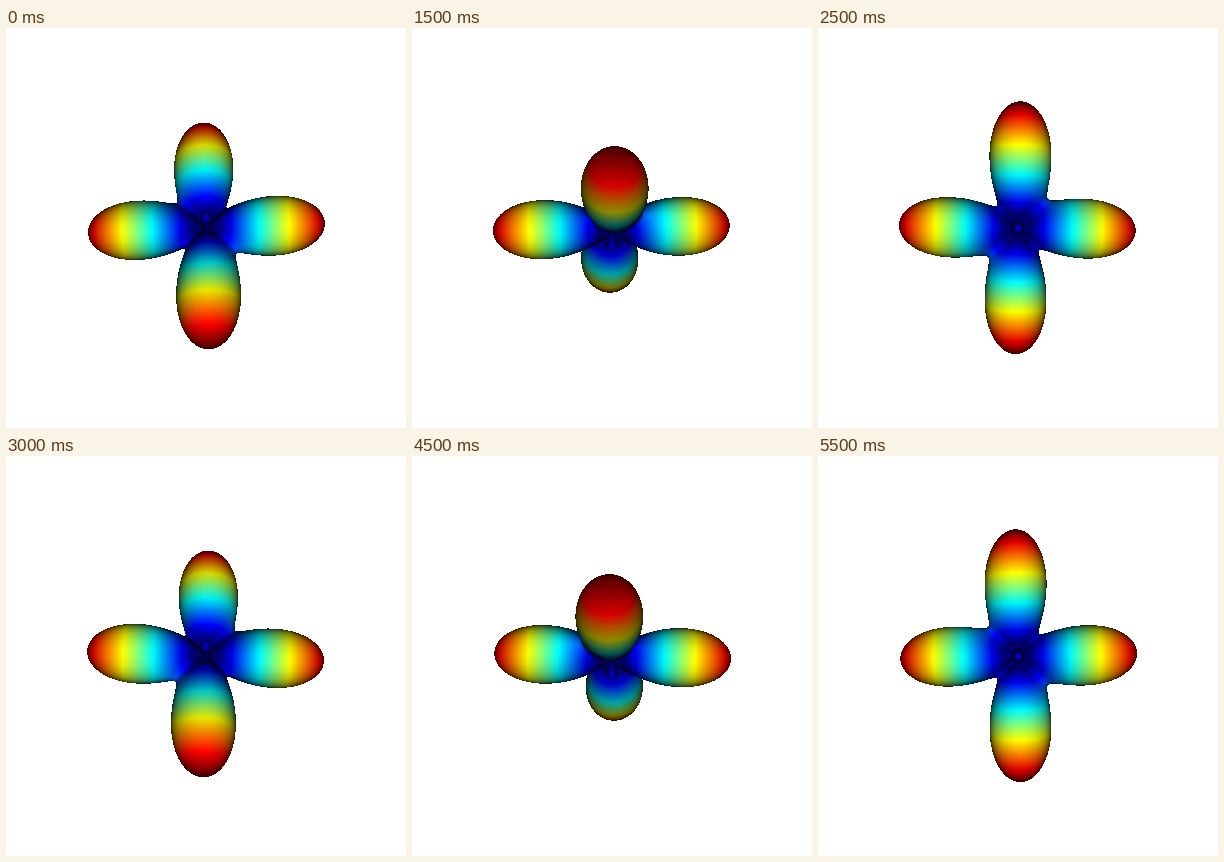
Recreate the animation shown at these times as an HTML page with a canvas. Size 400x400 px, loop 6000 ms.

```html
<!DOCTYPE html>
<html lang="en">
<head>
<meta charset="utf-8">
<title>Rotating four-lobed surface</title>
<style>
  html, body { margin: 0; width: 100%; height: 100%; overflow: hidden; background: #fff; }
  canvas { display: block; }
</style>
</head>
<body>
<canvas id="stage" width="400" height="400"></canvas>
<script>
const SIZE = 400, MID = SIZE / 2;
const STEP_MS = 500, STEPS = 12;
const FIRST_ANGLE = 209;
const EYE = MID / Math.tan(Math.PI / 12); // 30 degree field of view
const LONG = 126, SHORT = 117.5, WAIST = 26, REACH = 130;
const COLOR_MIN = 18; // radius at the blue end of the colour scale

const ctx = document.getElementById('stage').getContext('2d');
const poses = [];

// Surface radius in the body direction (a, b, c); n2 is its squared length.
function radius(a, b, c, n2) {
  const aa = a * a, bb = b * b, cc = c * c, ab = a * b;
  const quartic = SHORT * aa * aa + LONG * bb * bb + WAIST * cc * cc
    - 16.3 * aa * ab + 16.2 * ab * bb;
  const sextic = -aa * bb * (78 * aa + 117 * bb)
    - aa * cc * (85 * aa + 40 * cc)
    - bb * cc * (150 * bb + 15 * cc)
    - 28 * aa * aa * a * c + 44 * ab * ab * ab;
  return (quartic + sextic / n2) / (n2 * n2);
}

const clamp = v => Math.max(0, Math.min(1, v));
const ramp = (v, peak) => clamp(1.5 - Math.abs(4 * v - peak));
const jet = v => [ramp(v, 3), ramp(v, 2), ramp(v, 1)];

function renderPose(step) {
  const angle = (FIRST_ANGLE + step * 360 / STEPS) * Math.PI / 180;
  const cos = Math.cos(angle), sin = Math.sin(angle);
  const image = ctx.createImageData(SIZE, SIZE);
  const data = image.data;
  data.fill(255);

  // Positive outside the surface, negative inside.
  function field(x, y, z) {
    const n2 = x * x + y * y + z * z + 1e-6;
    return Math.sqrt(n2) - radius(x, y * cos - z * sin, y * sin + z * cos, n2);
  }

  function findDepth(px, py) {
    const h2 = REACH * REACH - px * px - py * py;
    if (h2 < 0) return null;
    const h = Math.sqrt(h2);
    const at = z => field(px * (1 - z / EYE), py * (1 - z / EYE), z);
    const stride = 3;
    for (let z = Math.min(LONG, h + 25); z > -h - 5; z -= stride) {
      if (at(z) >= 0) continue;
      let inside = z, outside = z + stride;
      for (let i = 0; i < 9; i++) {
        const m = (inside + outside) / 2;
        if (at(m) < 0) inside = m; else outside = m;
      }
      return outside;
    }
    return null;
  }

  function shade(x, y, z) {
    const e = 0.05;
    const gx = field(x + e, y, z) - field(x - e, y, z);
    const gy = field(x, y + e, z) - field(x, y - e, z);
    const gz = field(x, y, z + e) - field(x, y, z - e);
    return clamp(gz / (Math.hypot(gx, gy, gz) || 1));
  }

  for (let row = 0; row < SIZE; row++) {
    for (let col = 0; col < SIZE; col++) {
      const px = col + 0.5 - MID, py = MID - row - 0.5;
      const z = findDepth(px, py);
      if (z === null) continue;
      const k = 1 - z / EYE, x = px * k, y = py * k;
      const light = 255 * shade(x, y, z);
      const color = jet(clamp((Math.hypot(x, y, z) - COLOR_MIN) / (LONG - COLOR_MIN)));
      const i = 4 * (row * SIZE + col);
      for (let ch = 0; ch < 3; ch++) data[i + ch] = light * color[ch];
    }
  }
  return image;
}

let shown = -1;
function draw(now) {
  const step = Math.floor(now / STEP_MS) % STEPS;
  if (step !== shown) {
    poses[step] = poses[step] || renderPose(step);
    ctx.putImageData(poses[step], 0, 0);
    shown = step;
  }
}

let start = null;
function tick(now) {
  if (start === null) start = now;
  draw(now - start);
  requestAnimationFrame(tick);
}
requestAnimationFrame(tick);
</script>
</body>
</html>
```
